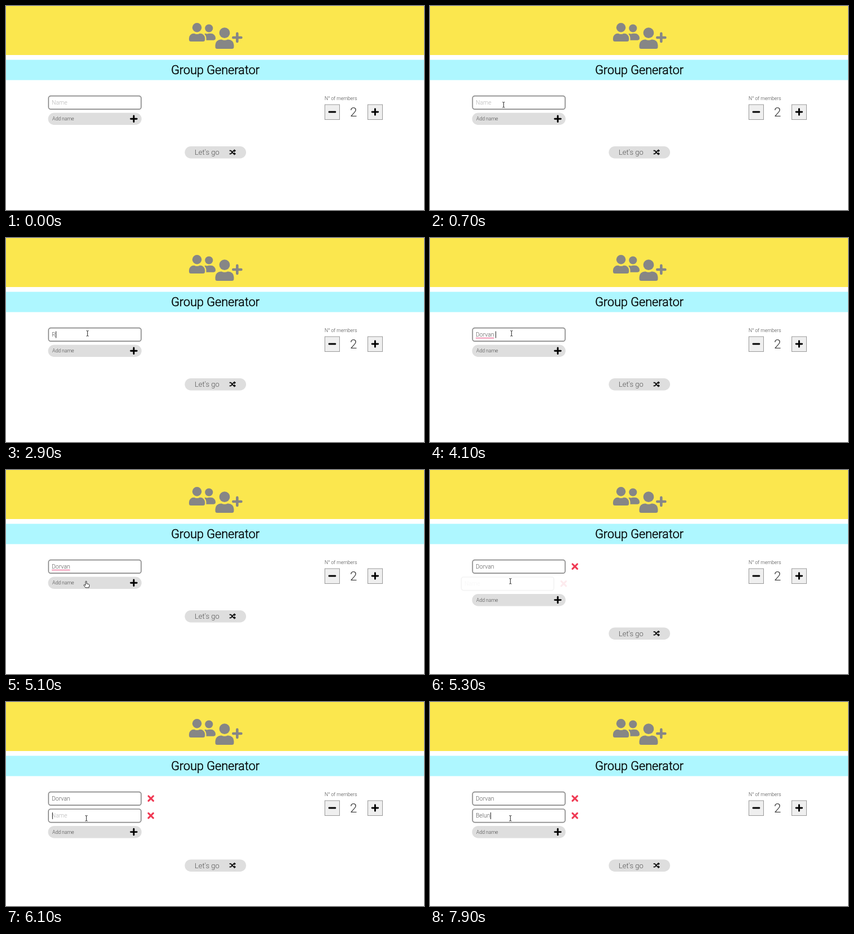
An HTML page that plays this animation: 740x362 px, repeating every 8 s.

```html
<!DOCTYPE html>
<html lang="en">
<head>
<meta charset="utf-8">
<title>Group Generator</title>
<style>
  html, body { margin: 0; width: 100%; height: 100%; overflow: hidden; background: #fff; }
  svg { display: block; width: 740px; height: 362px; }
  text { font-family: Roboto, "Liberation Sans", sans-serif; font-weight: 300; white-space: pre; }
  .title { font-size: 21.6px; text-anchor: middle; stroke: #000; stroke-width: .45px; }
  .field rect { fill: #fff; stroke: #8a8a8a; stroke-width: 1.7px; }
  .field text { font-size: 10.4px; fill: #555; }
  .field .hint { fill: #b4b4b4; }
  .small { font-size: 8.65px; fill: #444; }
  .go { font-size: 13px; fill: #555; }
  .count { font-size: 22.5px; fill: #333; text-anchor: middle; }
  .pill { fill: #dedede; }
  .step { fill: #efefef; stroke: #999; }
</style>
</head>
<body>
<svg viewBox="0 0 740 362">
  <defs>
    <path id="plus" d="M-5.3 0H5.3M0-5.3V5.3" fill="none" stroke="#000" stroke-width="2.9" stroke-linecap="round"/>
    <path id="cross" d="M-4.2-4.2 4.2 4.2M4.2-4.2-4.2 4.2" fill="none" stroke="#f03a54" stroke-width="3.1" stroke-linecap="round"/>
  </defs>

  <rect width="740" height="87" fill="#fbe74e"/>
  <rect y="95.5" width="740" height="36" fill="#aef7ff"/>
  <g fill="#868686">
    <g transform="translate(324 27.7) scale(.0735)">
      <circle cx="192" cy="144" r="112"/>
      <path d="M115 288h9a158 158 0 0 0 136 0h9a115 115 0 0 1 115 115v29a48 48 0 0 1-48 48H48a48 48 0 0 1-48-48v-29a115 115 0 0 1 115-115z"/>
      <circle cx="480" cy="160" r="96"/>
      <path d="M384 288h4a136 136 0 0 0 88 0h52a112 112 0 0 1 112 112 48 48 0 0 1-48 48H415v-45c0-39-15-74-40-100z"/>
    </g>
    <g transform="translate(370.5 38.3) scale(.0735)">
      <circle cx="224" cy="128" r="128"/>
      <path d="M134 288h17a175 175 0 0 0 146 0h17a134 134 0 0 1 134 134v42a48 48 0 0 1-48 48H48a48 48 0 0 1-48-48v-42a134 134 0 0 1 134-134z"/>
      <path d="M432 240H624M528 144V336" stroke="#868686" stroke-width="62" stroke-linecap="round"/>
    </g>
  </g>
  <text class="title" x="370.5" y="121">Group Generator</text>

  <g class="field" id="first"></g>
  <g class="field" id="second"></g>

  <g id="lower">
    <rect class="pill" x="74.5" y="189.5" width="165.5" height="21.5" rx="10.75"/>
    <text class="small" x="82" y="203.2">Add name</text>
    <use href="#plus" x="226.2" y="200.2"/>
    <rect class="pill" x="316.5" y="249" width="108.5" height="21.5" rx="10.75"/>
    <text class="go" x="334" y="264.2">Let's go</text>
    <g transform="translate(395 254.4)">
      <path d="M.6 2.3H3L8 7.9H9.5M.6 7.9H3L8 2.3H9.5" fill="none" stroke="#000" stroke-width="1.7"/>
      <path d="M8.8-.4 12 2.3 8.8 5zM8.8 5.2 12 7.9 8.8 10.6z"/>
    </g>
  </g>

  <text class="small" x="564" y="166.8">N° of members</text>
  <rect class="step" x="564.5" y="175" width="26" height="26.5"/>
  <rect class="step" x="640.5" y="175" width="26" height="26.5"/>
  <rect x="570.8" y="186.6" width="13.4" height="3" rx="1"/>
  <use href="#plus" x="653.4" y="188"/>
  <text class="count" x="615.3" y="196.3">2</text>

  <g id="cursor">
    <path id="arrow" d="M0 0V10L2.4 7.8 4 11.4 5.6 10.7 4 7.2H7.2z" fill="#000" stroke="#fff" stroke-width=".7"/>
    <path id="hand" d="M-1 0Q0-1.2 1 0V4L5 5Q6 5.4 5.8 7L5 11H-1L-4 7Q-4.2 5.6-3 5.8L-1 7z" fill="#fff" stroke="#000" stroke-width=".8"/>
    <path id="beam" d="M-2-4.8Q0-4.8 0-3.8 0-4.8 2-4.8M0-4V4M-2 4.8Q0 4.8 0 3.8 0 4.8 2 4.8" fill="none" stroke="#222"/>
  </g>
</svg>

<script>
const LOOP = 8000, TICK = 100, ROW = 30.4, ADDED = 5200, SLIDE = 1000;
const $ = id => document.getElementById(id);
const show = (el, on) => { el.style.display = on ? '' : 'none'; };

// Time and number of letters typed, after an initial slip
const NAME_A = 'Dorvan ', NAME_B = 'Belun';
const typed = (name, times) => times.map((at, i) => [at, name.slice(0, i + 1)]);
const typingA = [[0, ''], [2500, 'R'], [3000, ''],
  ...typed(NAME_A, [3100, 3300, 3400, 3600, 3800, 3900, 4100]),
  [ADDED, NAME_A.trim()]];
const typingB = [[0, ''], ...typed(NAME_B, [6700, 6900, 7200, 7500, 7800])];
const caretA = [[1400, 1900], [2400, 4700]];
const caretB = [[5900, 6400], [6700, LOOP]];

const path = [
  [100, 508, 42], [300, 424, 112], [500, 245, 203], [600, 119, 180],
  [700, 130, 175], [900, 144, 168], [1200, 144, 169], [4600, 144, 169],
  [5000, 141, 198], [5200, 142, 197], [5500, 142, 197], [5900, 142, 206]
];

function makeField(id, y) {
  const g = $(id);
  g.innerHTML = `
    <rect x="75.3" y="${y + .6}" width="164" height="23.6" rx="4"/>
    <text class="hint" x="81" y="${y + 15.7}">Name</text>
    <text class="value" x="81" y="${y + 15.7}"></text>
    <path class="spell" stroke="#e8467c" d=""/>
    <path class="caret" stroke="#222" d=""/>
    <use href="#cross" x="256.5" y="${y + 12.2}"/>`;
  const part = sel => g.querySelector(sel);
  const [hint, value, spell, caret, cross] =
    ['.hint', '.value', '.spell', '.caret', 'use'].map(part);
  return {
    g,
    draw(text, caretOn, misspelt, removable) {
      value.textContent = text;
      const end = 81.5 + (text ? value.getComputedTextLength() : 0);
      show(hint, !text);
      show(caret, caretOn);
      show(spell, misspelt);
      show(cross, removable);
      caret.setAttribute('d', `M${Math.round(end) + .5} ${y + 6.5}v12`);
      spell.setAttribute('d', `M81 ${y + 18.5}H${end - 3}`);
    }
  };
}

const first = makeField('first', 159);
const second = makeField('second', 159 + ROW);

const latest = (steps, t) => steps.filter(s => s[0] <= t).pop()[1];
const within = (spans, t) => spans.some(([a, b]) => t >= a && t < b);

// CSS "ease": solve x(u) = p by bisection, return y(u)
function ease(p) {
  const bez = (u, a, b) => 3 * u * (1 - u) * (1 - u) * a + 3 * u * u * (1 - u) * b + u ** 3;
  let lo = 0, hi = 1;
  for (let i = 0; i < 24; i++) {
    const mid = (lo + hi) / 2;
    if (bez(mid, .25, .25) < p) lo = mid; else hi = mid;
  }
  return bez(lo, .1, 1);
}

function pointer(t) {
  const i = path.findIndex(k => k[0] > t);
  if (i < 0) return path[path.length - 1].slice(1);
  const [t0, x0, y0] = path[i - 1], [t1, x1, y1] = path[i];
  const k = (t - t0) / (t1 - t0);
  return [x0 + (x1 - x0) * k, y0 + (y1 - y0) * k];
}

function drawCursor(t, added) {
  show($('cursor'), t >= path[0][0]);
  if (t < path[0][0]) return;
  const [x, y] = pointer(t);
  const inside = (top, h) => x > 75 && x < 240 && y > top && y < top + h;
  let kind = 'arrow';
  if (inside(159, 25) || added && inside(159 + ROW, 25)) kind = 'beam';
  else if (inside(added ? 220 : 189.5, 21.5)) kind = 'hand';
  for (const id of ['arrow', 'hand', 'beam']) show($(id), id === kind);
  $('cursor').setAttribute('transform', `translate(${x + .3} ${y + .3})`);
}

function render(time) {
  const t = Math.floor(time % LOOP / TICK) * TICK;
  const added = t >= ADDED;
  first.draw(latest(typingA, t), within(caretA, t), t >= 4100 && !added, added);
  second.draw(latest(typingB, t), within(caretB, t), false, true);

  const k = ease(Math.min(1, Math.max(0, (t - ADDED) / SLIDE)));
  show(second.g, added);
  second.g.setAttribute('opacity', k);
  second.g.setAttribute('transform', `translate(${-22 * (1 - k)} 0)`);
  $('lower').setAttribute('transform', `translate(0 ${added ? ROW : 0})`);
  drawCursor(t, added);
}

const start = performance.now();
function loop() {
  render(performance.now() - start);
  requestAnimationFrame(loop);
}
loop();
</script>
</body>
</html>
```
